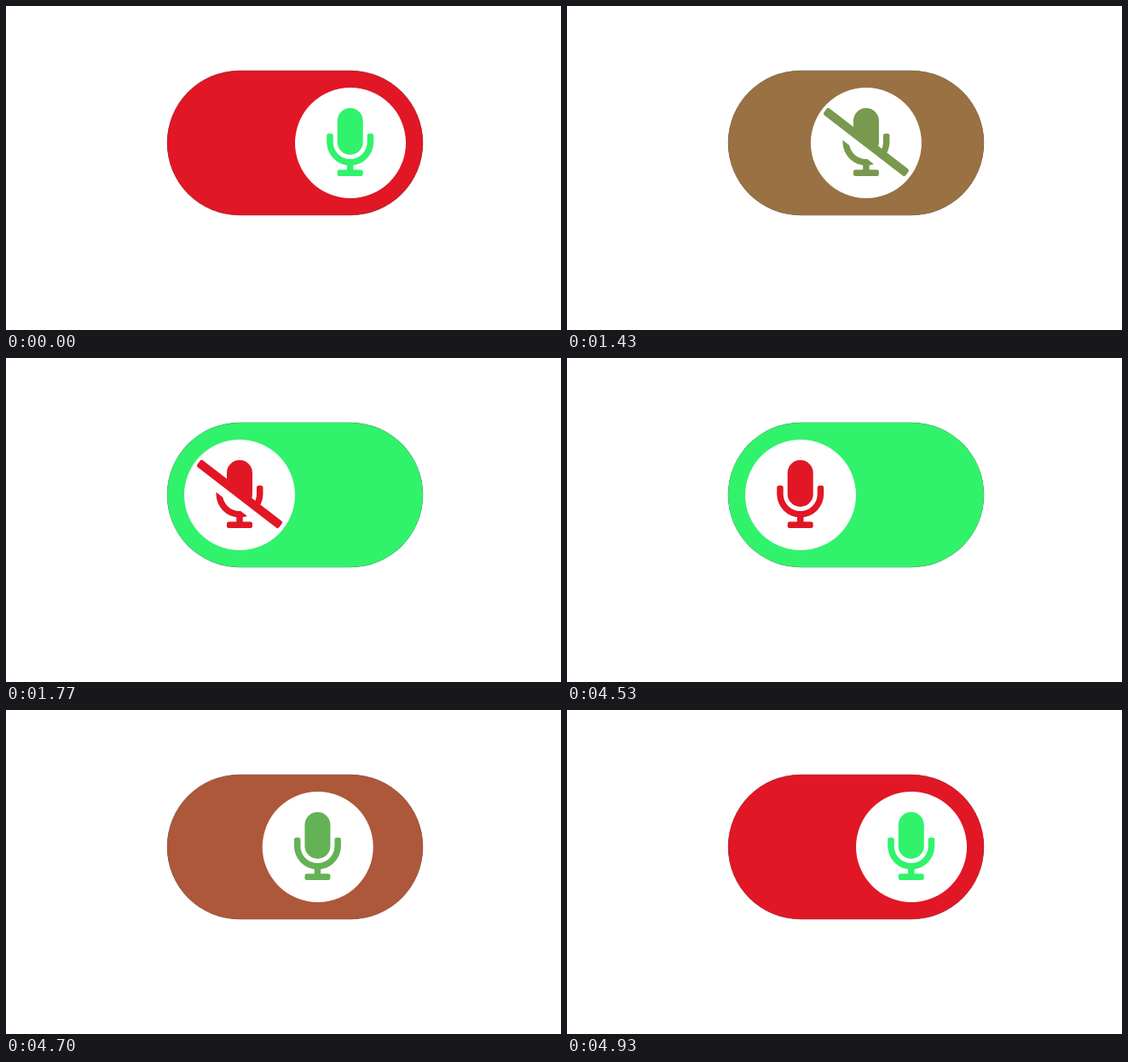
An HTML page with a canvas that plays this animation: 651 by 381 pixels, repeating every 6.33 s.

```html
<!DOCTYPE html>
<html lang="en">
<head>
<meta charset="utf-8">
<title>Microphone switch</title>
<style>
  html, body { margin: 0; width: 100%; height: 100%; overflow: hidden; background: #fff; }
  canvas { display: block; width: 651px; height: 381px; }
</style>
</head>
<body>
<canvas id="stage" width="651" height="381"></canvas>
<script>
const ctx = document.getElementById('stage').getContext('2d');

const LOOP = 6330, FPS = 30, SLIDE = 400;
const MUTE_AT = 40, UNMUTE_AT = 136; // in ticks of 1 / FPS
const RED = [225, 23, 37], GREEN = [48, 243, 107];
const ON_X = 404, OFF_X = 274, MID_Y = 161;
const ICON_SCALE = 80 / 512;
const SLOPE = 0.7729; // slant of the mute bar

const mix = (a, b, p) => a + (b - a) * p;
const mixColor = (a, b, p) => `rgb(${a.map((v, i) => Math.round(mix(v, b[i], p))).join()})`;

// cubic-bezier(.25, .1, .25, 1)
function ease(x) {
  if (x <= 0) return 0;
  if (x >= 1) return 1;
  const bezier = (s, p1, p2) => 3 * s * (1 - s) ** 2 * p1 + 3 * s * s * (1 - s) * p2 + s ** 3;
  let lo = 0, hi = 1;
  for (let i = 0; i < 30; i++) {
    const mid = (lo + hi) / 2;
    if (bezier(mid, 0.25, 0.25) < x) lo = mid; else hi = mid;
  }
  return bezier(lo, 0.1, 1);
}

function fillRound(x, y, w, h, r) {
  ctx.beginPath();
  ctx.roundRect(x, y, w, h, r);
  ctx.fill();
}

// The icon is drawn in units of 1/512 of its height, centred on (0, 0).
function drawCapsule() {
  fillRound(-96, -256, 192, 352, 96);
}

function drawCradle() {
  ctx.beginPath();
  ctx.moveTo(-176, 0);
  ctx.arc(0, 0, 176, Math.PI, 0, true);
  ctx.lineTo(176, -48);
  ctx.arcTo(176, -64, 160, -64, 16);
  ctx.arcTo(128, -64, 128, -48, 16);
  ctx.lineTo(128, 0);
  ctx.arc(0, 0, 128, 0, Math.PI);
  ctx.lineTo(-128, -48);
  ctx.arcTo(-128, -64, -144, -64, 16);
  ctx.arcTo(-176, -64, -176, -48, 16);
  ctx.closePath();
  ctx.fill();
}

function drawStand() {
  ctx.fillRect(-24, 170, 48, 45);
  fillRound(-96, 208, 192, 48, 16);
}

// Limits drawing to one side of a line parallel to the mute bar.
function withSlantClip(offset, farY, draw) {
  ctx.save();
  ctx.beginPath();
  ctx.moveTo(-400, offset - 400 * SLOPE);
  ctx.lineTo(400, offset + 400 * SLOPE);
  ctx.lineTo(400, farY);
  ctx.lineTo(-400, farY);
  ctx.clip();
  draw();
  ctx.restore();
}

function drawMic(muted) {
  if (!muted) {
    drawCapsule();
    drawCradle();
    drawStand();
    return;
  }
  withSlantClip(0, -600, () => { drawCapsule(); drawCradle(); });
  withSlantClip(121.3, 600, () => { drawCradle(); drawStand(); });
  ctx.rotate(Math.atan(SLOPE));
  fillRound(-388, -32, 776, 64, 16);
}

function draw(time) {
  const tick = Math.floor((time + 3.4) * FPS / 1000);
  const muted = tick >= MUTE_AT && tick < UNMUTE_AT;
  const since = start => ease((tick - start) * 1000 / FPS / SLIDE);
  const off = tick < UNMUTE_AT ? since(MUTE_AT) : 1 - since(UNMUTE_AT);
  const knobX = mix(ON_X, OFF_X, off);

  ctx.fillStyle = '#fff';
  ctx.fillRect(0, 0, 651, 381);

  ctx.fillStyle = '#555';
  fillRound(188.8, 75.8, 300.4, 170.4, 85.2);
  ctx.fillStyle = mixColor(RED, GREEN, off);
  fillRound(189, 76, 300, 170, 85);

  ctx.fillStyle = '#fff';
  fillRound(knobX - 65, MID_Y - 65, 130, 130, 65);

  ctx.save();
  ctx.translate(knobX - (muted ? 0 : 0.3), MID_Y - 1);
  ctx.scale(ICON_SCALE, ICON_SCALE);
  ctx.fillStyle = mixColor(GREEN, RED, off);
  drawMic(muted);
  ctx.restore();
}

const start = performance.now();
function loop() {
  draw((performance.now() - start) % LOOP);
  requestAnimationFrame(loop);
}
loop();
</script>
</body>
</html>
```
